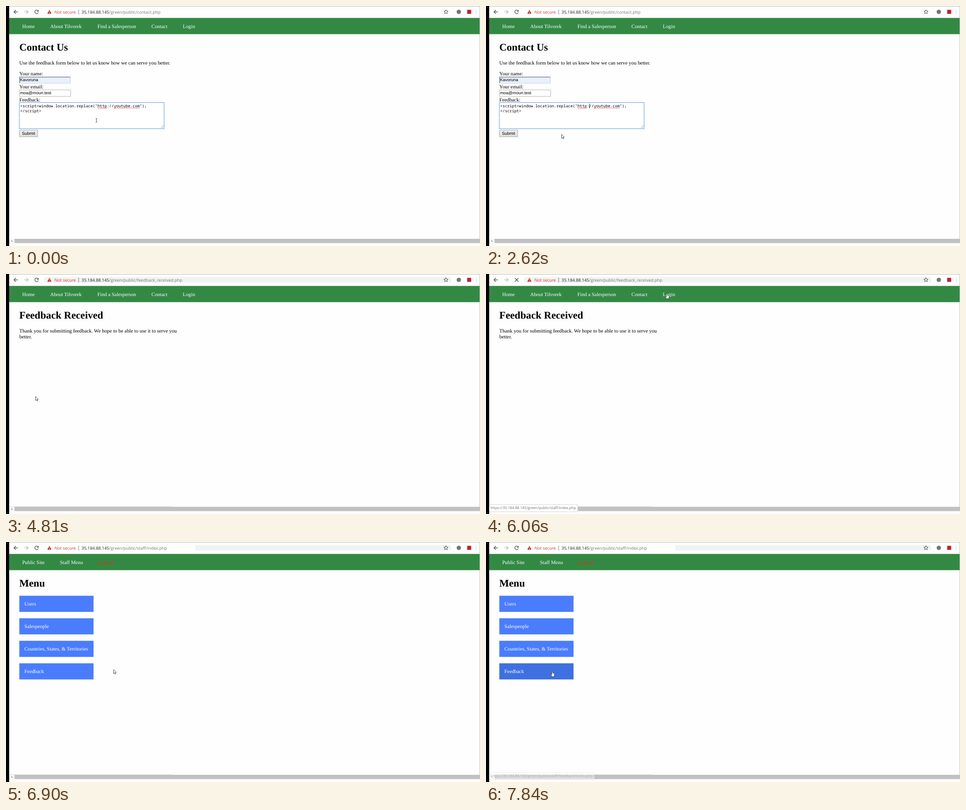
These frames come from a looping animation (1051 px wide and 533 px high, 7.99 s). An HTML page with a canvas:

```html
<!DOCTYPE html>
<html lang="en">
<head>
<meta charset="utf-8">
<title>Feedback form</title>
<style>
html, body { margin: 0; width: 100%; height: 100%; overflow: hidden; background: #fefefe; }
canvas { display: block; width: 1051px; height: 533px; }
</style>
</head>
<body>
<canvas id="stage" width="1051" height="533"></canvas>
<script>
const LOOP = 7990;
const ctx = document.getElementById('stage').getContext('2d');

const SERIF = '"Liberation Serif", serif';
const SANS = '"Liberation Sans", sans-serif';
const MONO = '"Noto Sans Mono", monospace';
const UI = '"Open Sans", sans-serif';

const BODY = `11.35px ${SERIF}`;
const TITLE = `bold 22.7px ${SERIF}`;
const FIELD = `9.45px ${SANS}`;
const CODE = `8.66px ${MONO}`;
const ADDRESS = `9.4px ${UI}`;
const STATUS = `8.04px ${UI}`;

const PAPER = '#fefefe';
const BLUE = '#5b97e8';
const HOST = '35.184.88.145';

// Pointer stops: time, x, y, shape. Each holds until the next one.
const POINTER = [
  [0, 200.5, 254, beam],
  [850, 160, 222, beam],
  [1000, 118, 184, beam],
  [1130, 95, 170, beam],
  [1280, 87, 193, beam],
  [1940, 160, 212, beam],
  [2080, 230, 223, beam],
  [2620, 167.5, 285, arrow],
  [2760, 132, 308, arrow],
  [2880, 100, 316, arrow],
  [3000, 78, 306, arrow],
  [3150, 64, 294, arrow],
  [3270, 58.5, 287.5, arrow],
  [4810, 65.5, 272, arrow],
  [4930, 120, 232, arrow],
  [5070, 205, 172, arrow],
  [5210, 290, 112, arrow],
  [5350, 358, 60, arrow],
  [5490, 392, 29, arrow],
  [5620, 401, 43, hand],
  [6210, 400.5, 43, arrow],
  [6490, 394, 64, arrow],
  [6620, 350, 128, arrow],
  [6760, 285, 222, arrow],
  [6900, 238.5, 283.5, arrow],
  [7020, 237, 288, arrow],
  [7160, 236, 290, arrow],
  [7300, 235, 289, arrow],
  [7440, 234, 288, arrow],
  [7570, 196, 287, arrow],
  [7700, 162, 286, hand],
  [7840, 147, 287, hand]
];

const within = (t, from, to) => t >= from && t < to;

function rect(x, y, w, h, fill) {
  ctx.fillStyle = fill;
  ctx.fillRect(x, y, w, h);
}

function box(x, y, w, h, fill, edge) {
  rect(x, y, w, h, fill);
  ctx.strokeStyle = edge;
  ctx.lineWidth = 1;
  ctx.strokeRect(x + 0.5, y + 0.5, w - 1, h - 1);
}

function text(str, x, y, font, color = '#000') {
  ctx.font = font;
  ctx.fillStyle = color;
  ctx.fillText(str, x, y);
  return x + ctx.measureText(str).width;
}

function line(points, color, width = 1) {
  ctx.beginPath();
  points.forEach(([x, y]) => ctx.lineTo(x, y));
  ctx.strokeStyle = color;
  ctx.lineWidth = width;
  ctx.stroke();
}

function shape(points, fill, edge, width = 0.8) {
  ctx.beginPath();
  points.forEach(([x, y]) => ctx.lineTo(x, y));
  ctx.closePath();
  if (fill) { ctx.fillStyle = fill; ctx.fill(); }
  if (edge) { ctx.strokeStyle = edge; ctx.lineWidth = width; ctx.stroke(); }
}

function disc(x, y, r, fill) {
  ctx.beginPath();
  ctx.arc(x, y, r, 0, Math.PI * 2);
  ctx.fillStyle = fill;
  ctx.fill();
}

function beam() {
  line([[-2, -4], [2, -4]], '#444', 0.8);
  line([[0, -4], [0, 4]], '#444', 0.9);
  line([[-2, 4], [2, 4]], '#444', 0.8);
}

function arrow() {
  shape([[0, 0], [0, 8.8], [2, 7], [3.4, 10], [4.8, 9.4], [3.4, 6.4], [6.2, 6.2]], '#fff', '#222');
}

function hand() {
  shape([[-1, 0.6], [0, 0], [1, 0.6], [1.1, 4], [4.4, 4.8], [5, 6],
    [4.8, 9], [3.8, 12], [-0.4, 12], [-3.4, 7.6], [-2.6, 6.6], [-1, 8]], '#fff', '#222');
}

function backArrow(x, dir, color) {
  line([[x - 4.5 * dir, 13], [x + 4.5 * dir, 13]], color, 1.2);
  line([[x, 8.7], [x - 4.4 * dir, 13], [x, 17.3]], color, 1.2);
}

function reloadIcon(loading) {
  if (loading) {
    line([[64, 9], [72, 17]], '#444', 1.2);
    line([[72, 9], [64, 17]], '#444', 1.2);
    return;
  }
  ctx.beginPath();
  ctx.arc(68, 13, 4, 0.35, Math.PI * 1.75);
  ctx.strokeStyle = '#444';
  ctx.lineWidth = 1.2;
  ctx.stroke();
  shape([[72.4, 8.4], [72.4, 12.4], [68.4, 12.4]], '#444');
}

function star(x, y) {
  const points = Array.from({ length: 10 }, (_, i) => {
    const a = i * Math.PI / 5 - Math.PI / 2;
    const r = i % 2 ? 2.2 : 5;
    return [x + r * Math.cos(a), y + r * Math.sin(a)];
  });
  shape(points, null, '#444', 1);
}

function browser(path, loading, pillStart) {
  rect(0, 0, 1051, 533, PAPER);
  if (pillStart) {
    ctx.fillStyle = '#f1f2f3';
    ctx.beginPath();
    ctx.roundRect(pillStart, 7, 988 - pillStart, 12, pillStart < 100 ? 6 : [0, 6, 6, 0]);
    ctx.fill();
  }
  backArrow(22, 1, '#444');
  backArrow(45, -1, '#b8b8b8');
  reloadIcon(loading);
  shape([[96.3, 8.6], [101, 17], [91.6, 17]], '#cf2a20');
  rect(95.8, 11.6, 1, 2.7, '#fff');
  rect(95.8, 15, 1, 1, '#fff');
  text('Not secure', 107.5, 16.5, ADDRESS, '#cc3a30');
  rect(160.6, 8, 1, 11, '#777');
  const end = text(HOST, 167.6, 16.5, ADDRESS, '#222');
  text('/green/public/' + path, end, 16.5, ADDRESS, '#777');
  star(975.5, 13);
  disc(1004, 13, 4.8, '#74777a');
  rect(1022.5, 8.5, 9, 9, '#c2202e');
  rect(1042, 8, 1, 11, '#d4d4d4');
  rect(7, 26.5, 1044, 36, '#338944');
}

function frameEdges(residue) {
  rect(7, 517, 12, 10, '#f4f4f4');
  shape([[11, 522], [14, 519.8], [14, 524.2]], '#a0a0a0');
  rect(19, 517, 1032, 9.6, '#c1c1c1');
  if (residue) rect(7, 516, 361, 1, '#e2e2e2');
  rect(0, 0, 1051, 0.8, '#a8a8a8');
  rect(1050, 0, 1, 517, '#c4c4c4');
  rect(0, 0, 7, 533, '#000');
}

function nav(items) {
  items.forEach(([label, x, color = '#fff']) => text(label, x, 49, BODY, color));
}

const publicNav = () => nav([['Home', 36], ['About Tilvorek', 98], ['Find a Salesperson', 202.8],
  ['Contact', 322.6], ['Login', 392]]);

function squiggle(x1, x2, y) {
  const points = [];
  for (let x = x1; x <= x2; x += 1) points.push([x, y + (Math.round(x - x1) % 4 < 2 ? -0.4 : 0.5)]);
  line(points, '#e8403c', 0.9);
}

function caret(x, y, h = 10) {
  rect(x, y, 1, h, '#222');
}

function contactPage(t) {
  const emailFocus = within(t, 1550, 2080);
  const areaFocus = !emailFocus && t < 3550;
  browser('contact.php', t >= 3700, 0);
  publicNav();
  text('Contact Us', 29.6, 98.5, TITLE);
  text('Use the feedback form below to let us know how we can serve you better.', 29.6, 129.8, BODY);

  text('Your name:', 29.6, 154, BODY);
  rect(29.5, 157, 114, 15.2, '#dcdcdc');
  rect(29.5, 157, 113, 14.2, '#808080');
  rect(31, 158.5, 111.6, 12.8, '#e8f0fd');
  text('Kavoruna', 30.9, 167.4, FIELD);

  text('Your email:', 29.6, 183, BODY);
  box(29.4, 185.8, 114.4, 15.4, '#fff', emailFocus ? BLUE : '#b0b0b0');
  text('moa@moun.test', 30.9, 196.2, FIELD);
  if (emailFocus) caret(87, 188);

  text('Feedback:', 29.6, 211.6, BODY);
  box(29, 214, 322, 59, '#fff', areaFocus ? BLUE : '#a6a6a6');
  text('<script>window.location.replace("http://youtube.com");', 31.5, 225.4, CODE);
  text('<\/script>', 31.5, 236.1, CODE);
  squiggle(203, 224, 226.8);
  squiggle(239.5, 297, 226.8);
  line([[343, 271], [349, 265]], '#888', 0.8);
  line([[346, 271], [349, 268]], '#888', 0.8);
  if (within(t, 150, 550) || within(t, 1000, 1550)) caret(312, 217);
  if (within(t, 2080, 2760) || within(t, 3270, 3550)) caret(229, 217);

  const hot = t >= 3150;
  const shade = ctx.createLinearGradient(0, 275, 0, 291);
  shade.addColorStop(0, '#f3f3f3');
  shade.addColorStop(1, '#dedede');
  box(29.3, 275.3, 41.4, 15.6, shade, hot ? '#777' : '#a8a8a8');
  text('Submit', 35.2, 286.2, FIELD);
}

function receivedPage(t) {
  browser('feedback_received.php', t < 4280 || t >= 5910, 84);
  publicNav();
  text('Feedback Received', 29.6, 98.5, TITLE);
  text('Thank you for submitting feedback. We hope to be able to use it to serve you', 29.6, 129.8, BODY);
  text('better.', 29.6, 142.8, BODY);
}

function menuPage(t) {
  browser('staff/index.php', false, 420);
  nav([['Public Site', 36], ['Staff Menu', 119.5], ['Log out', 204.8, '#f02a10']]);
  text('Menu', 29.6, 98.5, TITLE);
  ['Users', 'Salespeople', 'Countries, States, & Territories', 'Feedback'].forEach((label, i) => {
    const y = 119.4 + i * 50;
    rect(29.5, y, 164.6, 35.8, i === 3 && t >= 7570 ? '#3f70e1' : '#4a7dfe');
    text(label, 40.8, y + 21.8, BODY, '#fff');
  });
}

function statusBubble(path, alpha) {
  const url = `https://${HOST}/green/public/staff/${path}`;
  ctx.save();
  ctx.globalAlpha = alpha;
  ctx.font = STATUS;
  const right = 14 + ctx.measureText(url).width;
  ctx.beginPath();
  ctx.roundRect(6, 512, right - 6, 16, [0, 2, 0, 0]);
  ctx.fillStyle = '#fff';
  ctx.fill();
  ctx.strokeStyle = '#d0d0d0';
  ctx.lineWidth = 1;
  ctx.stroke();
  text(url, 9.8, 522.4, STATUS, '#707070');
  ctx.restore();
  rect(0, 505, 7, 28, '#000');
}

function draw(t) {
  if (t < 4130) contactPage(t);
  else if (t < 6210) receivedPage(t);
  else menuPage(t);
  frameEdges(t >= 4130);

  if (within(t, 5620, 6490)) statusBubble('index.php', 1);
  if (within(t, 6490, 6620)) statusBubble('index.php', 0.4);
  if (t >= 7840) statusBubble('feedback/index.php', 0.4);

  const [, x, y, pointer] = POINTER.findLast(stop => stop[0] <= t);
  ctx.save();
  ctx.translate(x, y);
  pointer();
  ctx.restore();
}

ctx.textRendering = 'geometricPrecision';
const start = performance.now();
function tick() {
  draw((performance.now() - start) % LOOP);
  requestAnimationFrame(tick);
}
tick();
</script>
</body>
</html>
```
